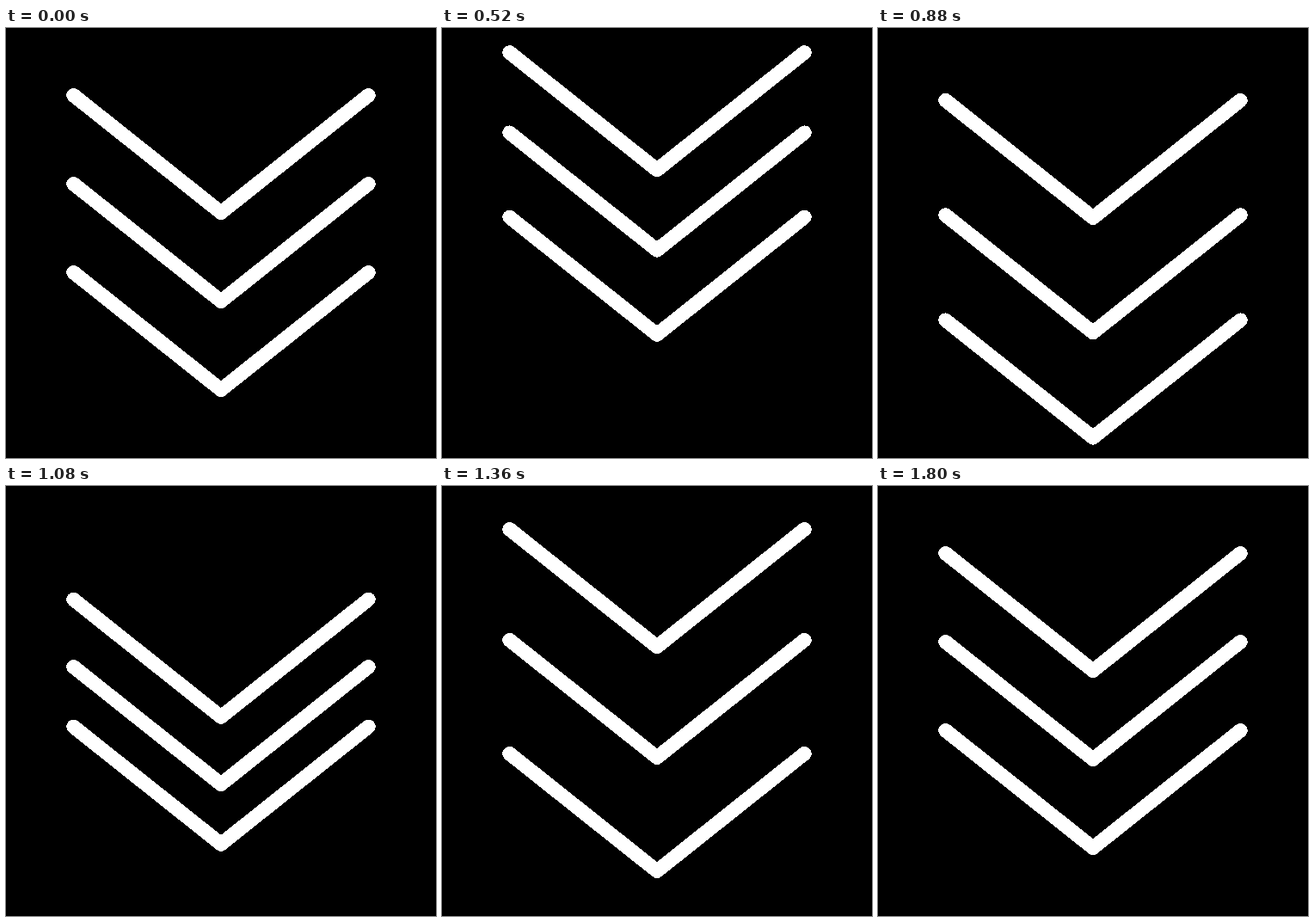
These frames come from a looping animation (500 by 500 pixels, 2000 ms). An HTML page:

```html
<!DOCTYPE html>
<html lang="en">
<head>
<meta charset="utf-8">
<title>Bouncing chevrons</title>
<style>
  html, body { margin: 0; width: 100%; height: 100%; overflow: hidden; background: #000; }
  svg { display: block; width: 100%; height: 100%; }
  path {
    fill: none; stroke: #fff; stroke-width: 16.5;
    stroke-linecap: round; stroke-linejoin: round; shape-rendering: crispEdges;
  }
</style>
</head>
<body>
<svg viewBox="0 0 500 500">
  <path d="M78.5 78.2 250 214.7 421.5 78.2"/>
  <path d="M78.5 181.2 250 317.7 421.5 181.2"/>
  <path d="M78.5 284.2 250 420.7 421.5 284.2"/>
</svg>
<script>
  const LOOP = 2000, TICK = 40, STEP = 50, STAGGER = 200 / 3;
  // [time in ms, vertical offset]
  const KEYS = [[34, 0], [516, -64.5], [881, 58], [1160, -37], [1437, 46.5], [1660, 0]];
  const chevrons = [...document.querySelectorAll('path')];
  const ease = p => p * p * (3 - 2 * p);

  function offset(t) {
    const i = KEYS.findIndex(key => key[0] > t);
    if (i < 1) return 0;
    const [t0, y0] = KEYS[i - 1], [t1, y1] = KEYS[i];
    return y0 + (y1 - y0) * ease((t - t0) / (t1 - t0));
  }

  function draw(now) {
    // 20 poses per second, shown on a 25 fps clock
    const tick = Math.floor(now % LOOP / TICK) * TICK;
    const t = Math.floor(tick / STEP) * STEP;
    chevrons.forEach((chevron, i) => {
      const y = offset(t - (2 - i) * STAGGER);
      chevron.setAttribute('transform', `translate(0 ${y.toFixed(2)})`);
    });
  }

  let start;
  function loop(now) {
    start ??= now;
    draw(now - start);
    requestAnimationFrame(loop);
  }
  draw(0);
  requestAnimationFrame(loop);
</script>
</body>
</html>
```
